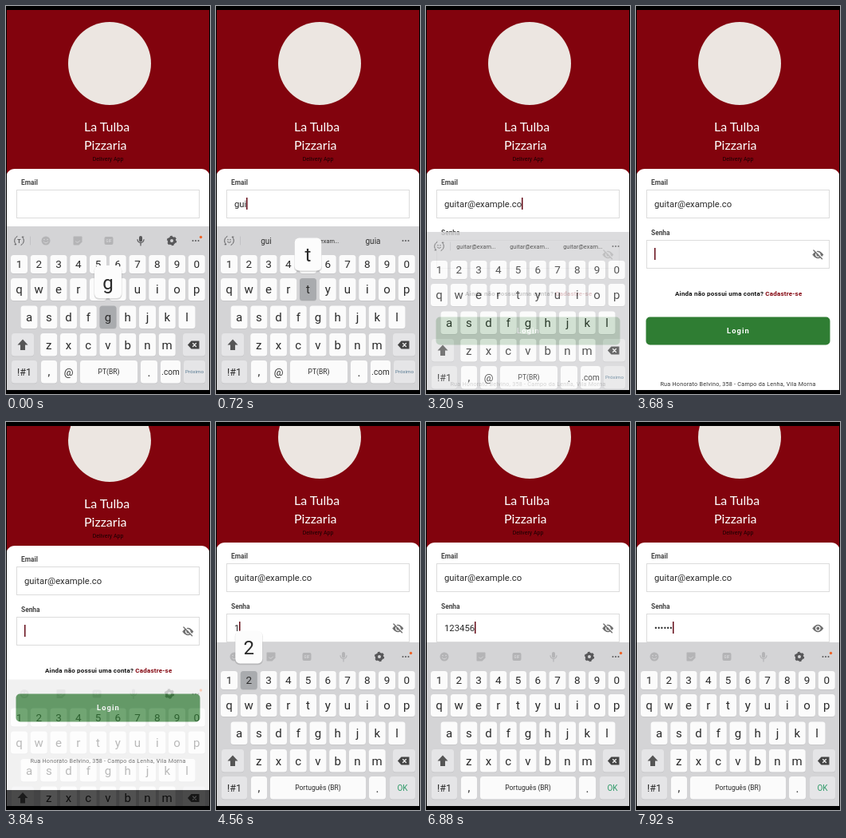
Recreate the animation shown at these times as an HTML page. Size 256 px wide and 486 px high, loop 8000 ms.

```html
<!DOCTYPE html>
<html lang="pt-BR">
<head>
<meta charset="utf-8">
<title>Login</title>
<style>
  html, body { margin: 0; width: 100%; height: 100%; overflow: hidden; background: #000; }
  svg { display: block; width: 100vw; height: 100vh; font-family: Roboto, sans-serif; }
  text { white-space: pre; }
</style>
</head>
<body>
<script>
const NS = 'http://www.w3.org/2000/svg';
const LOOP = 8000, STEP = 80;
const EMAIL = 'guitar@example.com';

function add(parent, tag, attrs = {}, content) {
  const el = document.createElementNS(NS, tag);
  for (const k in attrs) el.setAttribute(k, attrs[k]);
  if (content !== undefined) el.textContent = content;
  parent.append(el);
  return el;
}
const group = (parent, attrs) => add(parent, 'g', attrs);
const rect = (parent, x, y, width, height, rx, fill, more) =>
  add(parent, 'rect', { x, y, width, height, rx, fill, ...more });
const circle = (parent, cx, cy, r, fill, more) => add(parent, 'circle', { cx, cy, r, fill, ...more });
const line = (parent, d, stroke, width = 1) =>
  add(parent, 'path', { d, stroke, fill: 'none', 'stroke-width': width, 'stroke-linecap': 'round' });
// Text is placed by the middle of its capitals.
const label = (parent, x, midY, size, content, more) =>
  add(parent, 'text', { x, y: midY + size * 0.36, 'font-size': size, fill: '#2a2a2a', ...more }, content);
const centred = (parent, x, midY, size, content, more) =>
  label(parent, x, midY, size, content, { 'text-anchor': 'middle', ...more });
const show = (el, on) => el.setAttribute('display', on ? 'inline' : 'none');

const svg = add(document.body, 'svg', { viewBox: '0 0 256 486', preserveAspectRatio: 'none' });
const clip = add(add(svg, 'defs'), 'clipPath', { id: 'screen' });
rect(clip, 1, 5, 254, 476, 0, '#000');
const screen = group(svg, { 'clip-path': 'url(#screen)' });

// Page: it ends just below the screen, so panning up bares the black window.
const PAGE_END = 510;
const page = group(screen);
rect(page, 0, 0, 256, PAGE_END, 0, '#82030d');
circle(page, 130, 72, 52, '#ece6e1');
const heading = { 'font-family': 'Lato, sans-serif', fill: '#fff' };
label(page, 98, 151, 16, 'La Tulba', heading);
label(page, 98, 174, 16, 'Pizzaria', heading);
centred(page, 128, 191, 7, 'Delivery App', { fill: '#160002' });
rect(page, 0, 204, 256, 40, 11, '#fff');
rect(page, 0, 220, 256, PAGE_END - 220, 0, '#fff');

function field(name, labelY, boxY) {
  label(page, 19, labelY, 8.4, name, { 'font-weight': 700, fill: '#444' });
  rect(page, 13.5, boxY + 0.5, 229, 35, 0, '#fff', { stroke: '#dcdcdc' });
  const text = label(page, 23, boxY + 18, 11.3, '');
  const cursor = rect(page, 23, boxY + 10, 1.5, 15, 0, '#650c18');
  return (value, cursorOn) => {
    if (text.textContent !== value) text.textContent = value;
    cursor.setAttribute('x', 23 + (value ? Math.round(text.getComputedTextLength()) : 0));
    show(cursor, cursorOn);
  };
}
const setEmail = field('Email', 221, 230);
const setPassword = field('Senha', 284, 293);

const eye = group(page, { transform: 'translate(228.3 311.5)' });
add(eye, 'path', { d: 'M-7 0Q0-9.6 7 0Q0 9.6-7 0Z', fill: '#707070' });
circle(eye, 0, 0, 2.6, '#707070', { stroke: '#fff', 'stroke-width': 1.3 });
const slash = group(eye);
line(slash, 'M-4.4-6L6.2 4.6', '#fff', 1.4);
line(slash, 'M-5.4-5.4L5.2 5.2', '#707070', 1.4);

const signup = label(page, 49, 360, 8, 'Ainda não possui uma conta? ',
  { 'font-weight': 700, fill: '#111', 'letter-spacing': 0.2 });
add(signup, 'tspan', { fill: '#82030d' }, 'Cadastre-se');
rect(page, 12.5, 389.5, 231, 35, 5, '#2f7d33');
centred(page, 128.5, 407, 9.3, 'Login', { 'font-weight': 700, fill: '#fff', 'letter-spacing': 1.1 });
centred(page, 128, 473.5, 7.2, 'Rua Honorato Belvino, 358 - Campo da Lenha, Vila Morna',
  { fill: '#333', 'letter-spacing': 0.25 });

// Keyboard
const BAR = '#d4d4d6';
const keyboard = group(screen);
rect(keyboard, 0, 276, 256, 260, 0, BAR);
const keys = {};

function key(parent, id, x, y, w, h, size, { fill = '#fbfbfb', ink = '#2a2a2a', text = id } = {}) {
  rect(parent, x, y + 0.8, w, h, 3.5, '#c2c2c5');
  const face = rect(parent, x, y, w, h, 3.5, fill);
  if (text) centred(parent, x + w / 2, y + h / 2, size, text, { fill: ink });
  keys[id] = { face, fill, x: x + w / 2, y };
}
function keyRow(chars, firstX, y, h, size) {
  [...chars].forEach((c, i) => key(keyboard, c, firstX + i * 24.75 - 10.5, y, 21, h, size));
}
keyRow('1234567890', 16.5, 312, 23, 13.5);
keyRow('qwertyuiop', 16.5, 341, 28, 15);
keyRow('asdfghjkl', 29, 375.5, 28.5, 15);
keyRow('zxcvbnm', 53.7, 410, 28.5, 15);

const SPECIAL = '#e5e5e7';
key(keyboard, 'shift', 7, 410, 28, 28.5, 0, { fill: SPECIAL, text: '' });
add(keyboard, 'path', { d: 'M21 417.5l6.5 7h-3.5v6.5h-6v-6.5h-3.5z', fill: '#555' });
key(keyboard, 'back', 222, 410, 28, 28.5, 0, { fill: SPECIAL, text: '' });
add(keyboard, 'path', { d: 'M228 424.5l4.5-5h10v10h-10z', fill: '#444' });
line(keyboard, 'M234.5 422.5l4 4M238.5 422.5l-4 4', '#eee', 1.2);
key(keyboard, '!#1', 7, 444, 32, 28.5, 12.5, { fill: SPECIAL });
key(keyboard, ',', 44, 444, 20, 28.5, 14);

const emailRow = group(keyboard), passwordRow = group(keyboard);
key(emailRow, '@', 68, 444, 21, 28.5, 13);
key(emailRow, 'space', 93, 444, 72, 28.5, 8.5, { text: 'PT(BR)' });
key(emailRow, '.', 169, 444, 21, 28.5, 15);
key(emailRow, '.com', 194, 444, 25, 28.5, 10);
key(emailRow, 'next', 223, 444, 27, 28.5, 6.2, { fill: SPECIAL, ink: '#587a92', text: 'Próximo' });
key(passwordRow, 'space2', 68, 444, 120, 28.5, 8.5, { text: 'Português (BR)' });
key(passwordRow, 'dot2', 192, 444, 21, 28.5, 15, { text: '.' });
key(passwordRow, 'ok', 218, 444, 32, 28.5, 10, { fill: SPECIAL, ink: '#2f9a68', text: 'OK' });

// Toolbar above the keys
const DIM = '#b4b4b6', DARK = '#58585a', BAR_Y = 294;
const icons = {
  smile(g) {
    circle(g, 0, 0, 5.5, DIM);
    circle(g, -2, -1.4, 0.8, BAR);
    circle(g, 2, -1.4, 0.8, BAR);
    line(g, 'M-2.6 1.5Q0 4.5 2.6 1.5', BAR);
  },
  sticker(g) {
    add(g, 'path', { d: 'M-4.5-5.5h9a1 1 0 0 1 1 1v6l-4 4h-6a1 1 0 0 1-1-1v-9a1 1 0 0 1 1-1z', fill: DIM });
    line(g, 'M-2.5 1Q0 4 2.5 0', BAR);
  },
  gif(g) {
    rect(g, -5.5, -5, 11, 10, 2, DIM);
    centred(g, 0, 0, 4.5, 'GIF', { fill: BAR, 'font-weight': 700 });
  },
  mic(g, ink) {
    rect(g, -2, -6, 4, 7.5, 2, ink);
    line(g, 'M-4-1.5a4 4 0 0 0 8 0M0 3v3', ink, 1.2);
  },
  gear(g) {
    circle(g, 0, 0, 3.6, 'none', { stroke: DARK, 'stroke-width': 3.2 });
    circle(g, 0, 0, 5.4, 'none', { stroke: DARK, 'stroke-width': 1.6, 'stroke-dasharray': '2.83 2.83' });
  },
};
function toolbar(centres, micInk) {
  const g = group(keyboard);
  Object.values(icons).forEach((draw, i) =>
    draw(group(g, { transform: `translate(${centres[i]} ${BAR_Y})` }), micInk));
  circle(g, 244.5, 289.5, 1.7, '#ee6428');
  return g;
}
const emailTools = toolbar([50, 90, 129, 169, 208], DARK);
const passwordTools = toolbar([23, 69, 114, 160, 205], DIM);
[234.5, 238, 241.5].forEach(x => circle(keyboard, x, BAR_Y, 1, DARK));

const toggle = group(keyboard);
line(toggle, 'M14 288.6a6 6 0 0 0-1 10.2h-2M19 299.4a6 6 0 0 0 1-10.2h2', DARK, 1);
line(toggle, 'M30.5 289v10', '#bdbdc0', 0.8);
const toggleT = centred(toggle, 16.5, BAR_Y, 7, 'T', { fill: DARK, 'font-weight': 700 });
const toggleFace = group(toggle);
circle(toggleFace, 15, 292.8, 0.7, DARK);
circle(toggleFace, 18, 292.8, 0.7, DARK);
line(toggleFace, 'M14.5 295.5q2 2 4 0', DARK, 0.9);
const suggestions = [63, 130, 197].map(x => centred(keyboard, x, BAR_Y + 0.5, 10, '', { fill: '#333' }));

// Enlarged letter above a pressed key
const popup = group(screen);
rect(popup, -17.5, 0.8, 35, 42, 6, '#00000022');
rect(popup, -17, 0, 34, 41, 6, '#fcfcfc');
const popupText = centred(popup, 0, 21, 24, '');

// Taps: key, finger down, key released, letter entered (the popup stays until then)
const emailTaps = [['g', 0, 80, 160], ['u', 240, 320, 400], ['i', 480, 560, 640], ['t', 720, 800, 880]];
const passwordTaps = [['1', 4320, 4560, 4560], ['2', 4560, 4640, 4720], ['3', 4880, 4960, 5040],
  ['4', 5200, 5280, 5360], ['5', 5600, 5680, 5760], ['6', 6720, 6800, 6880]];
const taps = [...emailTaps, ['back', 2160, 2240, 2160], ...passwordTaps];
const PICK = 1680, ERASE = 2160, FOCUS = 3680, HIDE = 7280;

// Timelines: [start in ms, value]
const SHORT = EMAIL.slice(0, 11) + '...';
const emailCursor = [[0, 0], [160, 1], [1360, 0], [PICK, 1], [2640, 0], [3200, 1], [FOCUS, 0]];
const passwordCursor = [[0, 0], [FOCUS, 1], [4160, 0], [4560, 1], [6320, 0], [6880, 1], [7360, 0], [7840, 1]];
const suggested = [[0, null], [240, ['g', 'gosto', 'gente']], [480, ['gu', 'guitar', 'guia']],
  [720, ['gui', SHORT, 'guia']], [960, ['guit', SHORT, 'guitar']], [PICK, ['de', 'e', 'a']],
  [2560, [SHORT, SHORT, SHORT]], [FOCUS, null]];
const suggestionOpacity = [[0, 1], [2560, 0.4], [2640, 0.75], [2720, 1]];
const keyboardOpacity = [[0, 1], [3200, 0.8], [3280, 0.45], [3360, 0.15], [3440, 0],
  [3760, 0.08], [3840, 0.32], [3920, 0.75], [4000, 1]];
const keyboardY = [[0, 0], [3200, 7], [3280, 24], [3360, 44], [3760, 62], [3840, 46.5], [3920, 14], [4000, 0]];
const eyeOpacity = [[0, 1], [7120, 0.6], [7200, 0.3], [7280, 0.4], [7360, 0.7], [7440, 1]];

const at = (track, t) => track.findLast(([start]) => start <= t)[1];
const typed = (list, t) => list.filter(tap => tap[3] <= t).map(tap => tap[0]).join('');

function emailAt(t) {
  if (t >= ERASE) return EMAIL.slice(0, -1);
  return t >= PICK ? EMAIL : typed(emailTaps, t);
}
function passwordAt(t) {
  const digits = typed(passwordTaps, t);
  return t < HIDE ? digits : '•'.repeat(digits.length);
}
// The page pans up 53 px in 400 ms, slowing down with the fifth power.
function panAt(t) {
  const p = Math.min(Math.max((t - FOCUS) / 400, 0), 1);
  return 53 * (1 - (1 - p) ** 5);
}

function render(t) {
  const onPassword = t >= FOCUS, words = at(suggested, t);
  page.setAttribute('transform', `translate(0 ${-Math.round(panAt(t))})`);
  setEmail(emailAt(t), at(emailCursor, t));
  setPassword(passwordAt(t), at(passwordCursor, t));
  eye.setAttribute('opacity', at(eyeOpacity, t));
  show(slash, t < HIDE);

  keyboard.setAttribute('opacity', at(keyboardOpacity, t));
  keyboard.setAttribute('transform', `translate(0 ${at(keyboardY, t)})`);
  show(emailRow, !onPassword);
  show(passwordRow, onPassword);
  show(toggle, !onPassword);
  show(toggleT, !words);
  show(toggleFace, words);
  show(emailTools, !onPassword && !words);
  show(passwordTools, onPassword);
  suggestions.forEach((el, i) => {
    const word = words ? words[i] : '', size = word.length > 8 ? 7.4 : 10;
    el.textContent = word;
    el.setAttribute('font-size', size);
    el.setAttribute('y', BAR_Y + 0.5 + size * 0.36);
    el.setAttribute('opacity', at(suggestionOpacity, t));
  });

  const down = taps.find(([, from, to]) => from <= t && t < to);
  for (const id in keys) keys[id].face.setAttribute('fill', down && down[0] === id ? '#a9abae' : keys[id].fill);
  const raised = taps.find(([, from, , entered]) => from <= t && t < entered);
  show(popup, raised);
  if (raised) {
    const { x, y } = keys[raised[0]];
    popupText.textContent = raised[0];
    popup.setAttribute('transform', `translate(${Math.max(x, 24)} ${y - 50.5})`);
  }
}

const start = performance.now();
function tick() {
  const t = (performance.now() - start) % LOOP;
  render(Math.floor(t / STEP) * STEP);
  requestAnimationFrame(tick);
}
render(0);
requestAnimationFrame(tick);
</script>
</body>
</html>
```
